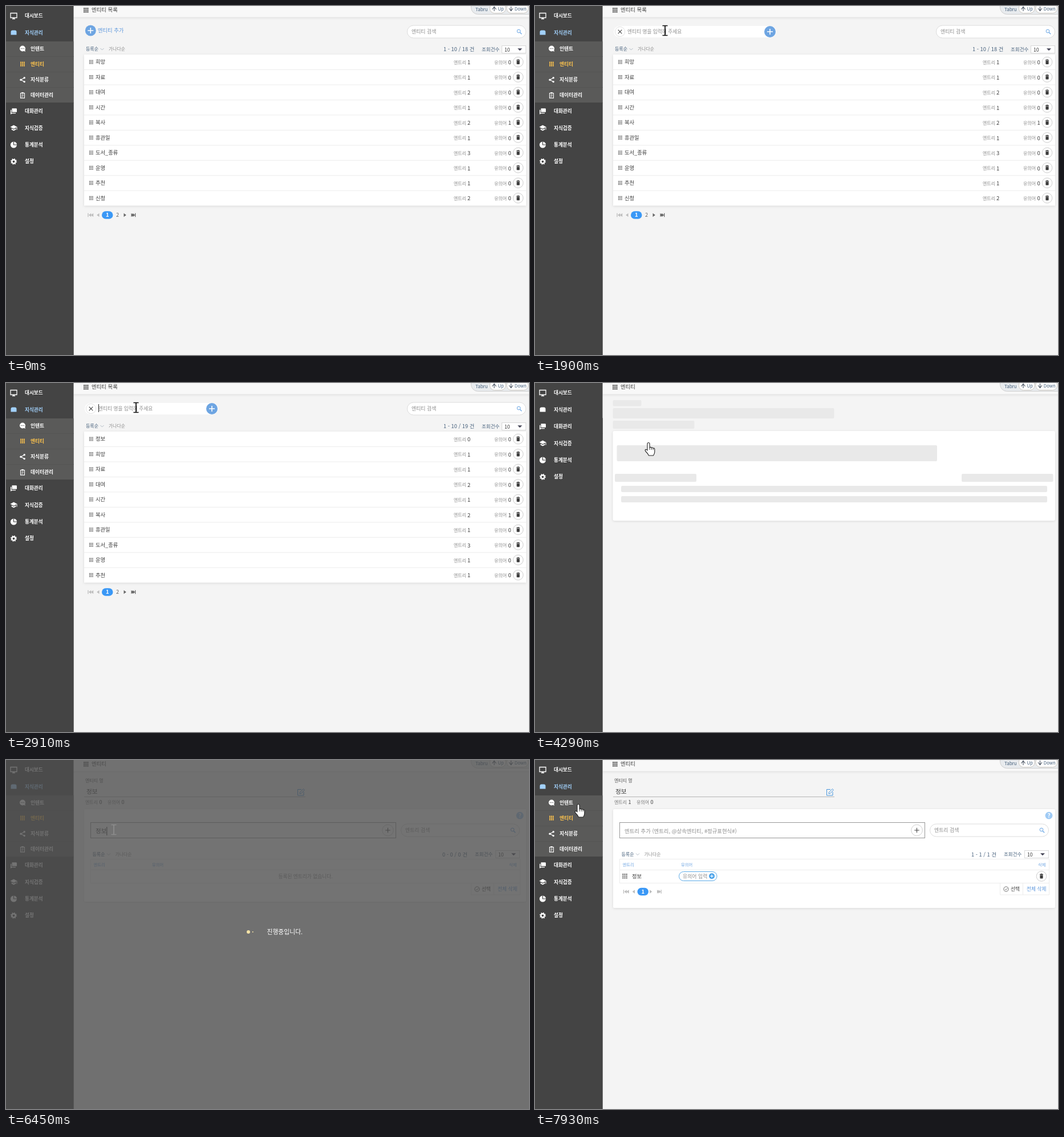
An HTML page that plays this animation: 917 px wide and 611 px high, repeating every 8 s.

```html
<!DOCTYPE html>
<html lang="ko">
<head>
<meta charset="utf-8">
<title>엔티티 관리</title>
<style>
html, body { margin: 0; width: 100%; height: 100%; overflow: hidden; background: #f4f4f4; }
svg { display: block; width: 100%; height: 100%; }
text { font-family: "Noto Sans CJK KR", "Noto Sans CJK JP", "Noto Sans CJK", "Noto Sans", sans-serif; white-space: pre; }
.card { fill: #fff; filter: drop-shadow(0 1px 2px #0000001c); }
.bar { filter: drop-shadow(0 1px 2px #0000001c); }
</style>
</head>
<body>
<svg id="stage" viewBox="0 0 917 611" xmlns="http://www.w3.org/2000/svg"></svg>
<script>
const BLUE = '#6ea5e2', INK = '#3b3b3b', NAVY = '#46607c', GRAY = '#8d8d8d', PALE = '#bdbdbd';

// Drawing helpers; text is placed by its left edge and vertical centre.
const text = (x, cy, size, fill, str, more = '') =>
  `<text x="${x}" y="${(cy + size * .36).toFixed(2)}" font-size="${size}" fill="${fill}" ${more}>${str}</text>`;
const rect = (x, y, w, h, fill, more = '') =>
  `<rect x="${x}" y="${y}" width="${w}" height="${h}" fill="${fill}" ${more}/>`;
const disc = (x, y, r, fill, more = '') => `<circle cx="${x}" cy="${y}" r="${r}" fill="${fill}" ${more}/>`;
const line = (d, color, w = 1, more = '') => `<path d="${d}" fill="none" stroke="${color}" stroke-width="${w}" ${more}/>`;
const shape = (d, fill, more = '') => `<path d="${d}" fill="${fill}" ${more}/>`;
const group = (id, body, more = '') => `<g id="${id}" ${more}>${body}</g>`;
const move = (x, y, body) => `<g transform="translate(${x} ${y})">${body}</g>`;
const repeat = (n, fn) => Array.from({ length: n }, (_, i) => fn(i)).join('');

const grip = (x, y, step, size, fill) => repeat(9, i =>
  rect(x + (i % 3 - 1) * step - size / 2, y + (Math.floor(i / 3) - 1) * step - size / 2, size, size, fill));
const plus = (x, y, r, color, w) => line(`M${x - r} ${y}h${2 * r}M${x} ${y - r}v${2 * r}`, color, w);
const chevron = (x, y) => line(`M${x - 3} ${y - 1.5}l3 3 3-3`, '#aab4bf', .9);
const lens = (x, y) => line(`M${x + 1.2} ${y + 1.2}l3 3`, '#6aa6e4', 1.3) +
  disc(x - 1, y - 1, 2.9, 'none', 'stroke="#6aa6e4"');
const trash = (x, y) => disc(x, y, 8.8, '#fff', 'stroke="#ccc"') +
  move(x, y, rect(-3, -3.8, 6, 1.3, INK) + rect(-1.2, -4.6, 2.4, 1.2, INK) + shape('M-2.6-1.9H2.6V3.2Q2.6 4 1.8 4H-1.8Q-2.6 4-2.6 3.2Z', INK));
const search = (x, y, w, str) => rect(x, y, w, 22, '#fff', 'rx="11" stroke="#dcdcdc"') +
  text(x + 7.5, y + 11, 8.9, GRAY, str) + lens(x + w - 11.5, y + 11);
const select = (x, y) => rect(x, y, 42, 13, '#fff', 'stroke="#d9d9d9"') +
  text(x + 4.5, y + 7, 8.7, INK, '10') + shape(`M${x + 27.5} ${y + 4.8}h8l-4 4z`, '#445');
const sorter = (x, y) => text(x, y, 8, NAVY, '등록순', 'font-weight="500"') + chevron(x + 28.5, y) +
  text(x + 40, y, 7.9, GRAY, '가나다순');
const total = (x, y, str) => text(x, y, 9.3, NAVY, str);
const pager = (x, y, pages, after) => {
  const back = n => shape(`M${n + 2} ${y - 3.3}v6.6l-4.3-3.3z`, PALE);
  const next = n => shape(`M${n - 2} ${y - 3.3}v6.6l4.3-3.3z`, after);
  const gap = pages > 1 ? 17 : 0;
  return rect(x - 3.7, y - 3.3, 1.3, 6.6, PALE) + back(x + .3) + back(x + 4.2) + back(x + 14.5) +
    rect(x + 21, y - 6.8, 19.5, 13.6, '#3a98f6', 'rx="6.8"') +
    text(x + 30.7, y, 9.5, '#fff', '1', 'text-anchor="middle" font-weight="700"') +
    (gap ? text(x + 48.5, y, 9.3, '#666', '2', 'text-anchor="middle"') : '') +
    next(x + 46 + gap - 1.5) + next(x + 60 + gap - 2.5) + next(x + 60 + gap) + rect(x + 60 + gap + 2, y - 3.3, 1.3, 6.6, after);
};

// Sidebar
const icons = {
  monitor: line('M-5.5-4.5h11v8h-11zM-2.5 5.5h5M0 3.5v2', '#fff', 1.3),
  box: shape('M-5-1Q-5-4-2-4H2Q5-4 5-1V4H-5Z', 'currentColor'),
  chat: shape('M-3-5H4.2Q5.5-5 5.5-3.7V1.6H-3Z', '#fff') + shape('M-5.5-2.5H-4V2.7H3.5V4H-3L-5.5 5.6Z', '#fff'),
  cap: shape('M0-5L6-1.8 0 1.4-6-1.8Z', '#fff') + shape('M-3.8.6L0 2.6 3.8.6V3L0 5-3.8 3Z', '#fff') + line('M5.5-1.8V3', '#fff'),
  pie: disc(0, 0, 5.6, '#fff') + line('M0-5.6V0H5.6', '#444', 1.2),
  gear: disc(0, 0, 3.1, 'none', 'stroke="#fff" stroke-width="2.4"') +
    disc(0, 0, 4.6, 'none', 'stroke="#fff" stroke-width="1.6" stroke-dasharray="1.8 1.81"')
};
const item = (y, icon, label, color = '#fff') => move(13.5, y, icons[icon]) +
  text(33, y, 8.6, color, label, 'font-weight="700"');
const subIcons = [
  disc(0, -.5, 5, '#fff') + shape('M1 3l4 2-1-4z', '#fff') + repeat(3, i => disc(i * 2.4 - 2.4, -.5, .7, '#555')),
  grip(0, -.5, 2.9, 2.1, '#ffc44d'),
  line('M3.5-3.5L-3 0 3.5 3.5', '#fff', 1.2) + disc(3.2, -3.4, 1.7, '#fff') + disc(-3, 0, 1.7, '#fff') + disc(3.2, 3.4, 1.7, '#fff'),
  line('M-3.5-3.8h7v8.6h-7z', '#fff', 1.1) + rect(-1.8, -5.2, 3.6, 2.4, '#fff') + line('M-1.8-.8h3.6M-1.8 1h3.6M-1.8 2.8h2', '#fff', .8)
];
const sidebar = rect(0, 0, 118.5, 611, '#444') + item(17, 'monitor', '대시보드') +
  rect(0, 62, 118.5, 108, '#5a5a59') +
  ['인텐트', '엔티티', '지식분류', '데이터관리'].map((label, i) => {
    const y = 75 + 27.1 * i;
    return (i ? rect(0, Math.round(y - 14), 118.5, 1, '#555554') : '') + move(29, y, subIcons[i]) +
      text(43, y, 8.7, i === 1 ? '#ffc44d' : '#fff', label, 'font-weight="700"');
  }).join('') +
  group('base', item(46.5, 'box', '지식관리', 'currentColor')) +
  group('lower', rect(0, 169, 118.5, 560, '#444') + item(184.2, 'chat', '대화관리') + item(213.6, 'cap', '지식검증') +
    item(243, 'pie', '통계분석') + item(272.3, 'gear', '설정'));

// Header
const arrow = (x, y, dir) => line(`M${x} ${y - 4}v8M${x - 3.5} ${y - dir}l3.5 ${dir * 4.6} 3.5 ${-dir * 4.6}`, '#4b5563', 1.1);
const header = rect(118.5, -5, 800, 24.5, '#f8f8f8', 'class="bar"') + grip(140.3, 7.3, 3.1, 2.2, '#4a4a4a') +
  group('titleList', text(150, 7, 9.4, INK, '엔티티 목록', 'font-weight="500"')) +
  group('titleOne', text(150, 7, 9.4, INK, '엔티티', 'font-weight="500"')) +
  rect(815.5, -12, 112, 26.5, '#e8ebee', 'rx="12" stroke="#cfcfcf"') + text(823, 6, 8, NAVY, 'Tabru') +
  rect(848.5, -5, 27.5, 17.5, '#fff', 'rx="8" stroke="#cdc8c0"') + arrow(856, 5, -1) + text(862.5, 5, 7.8, NAVY, 'Up') +
  rect(878, -5, 37.5, 17.5, '#fff', 'rx="8" stroke="#cdc8c0"') + arrow(885.5, 5, 1) + text(891.8, 5, 7.8, NAVY, 'Down');

// Entity list
const entities = [['정보', 0, 0], ['희망', 1, 0], ['자료', 1, 0], ['대여', 2, 0], ['시간', 1, 0], ['복사', 2, 1],
  ['휴관일', 1, 0], ['도서_종류', 3, 0], ['운영', 1, 0], ['추천', 1, 0], ['신청', 2, 0]];
const rows = from => entities.slice(from, from + 10).map(([name, entries, synonyms], i) => {
  const y = 98 + 26.47 * i;
  return (i ? rect(137, y - 13.5, 775, 1, '#ececec') : '') + grip(149.3, y, 2.6, 1.6, '#555') + text(157, y, 9.3, INK, name) +
    text(785, y + 1, 8, GRAY, '엔트리') + text(809, y + .8, 9.5, INK, entries) +
    text(856, y + 1, 8, GRAY, '유의어') + text(880.5, y + .8, 9.5, INK, synonyms) + trash(898, y);
}).join('');
const list = group('addLink', disc(148.3, 43, 9.5, BLUE) + plus(148.3, 43, 5, '#fff', 1.6) + text(161, 43, 9.3, '#5d97dc', '엔티티 추가')) +
  group('form', rect(138, 35, 0, 20, '#fff', 'rx="10" id="formBox"') + disc(149, 45, 8.6, '#fff', 'stroke="#e2e2e2"') +
    line('M145.7 41.7l6.6 6.6m0-6.6l-6.6 6.6', '#444', 1.1) + text(162, 44.5, 8.7, GRAY, '엔티티 명을 입력해 주세요', 'id="hint1"') +
    text(162, 44.5, 8.9, INK, '', 'id="typed1"') + rect(162, 37, 1, 14, '#222', 'id="caret1"') +
    group('formPlus', disc(0, 0, 10, BLUE) + plus(0, 0, 5, '#fff', 1.6))) +
  search(703.5, 34, 208, '엔티티 검색') + sorter(140, 75.5) + text(834, 75.5, 8.5, NAVY, '조회건수') + select(869.5, 69.5) +
  rect(137, 85, 775, 264.5, '#fff', 'class="card"') +
  group('rowsOld', total(767, 75.7, '1 - 10 / 18 건') + rows(1)) + group('rowsNew', total(767, 75.7, '1 - 10 / 19 건') + rows(0)) +
  pager(147, 366, 2, '#666');

// Loading placeholder
const skeleton = rect(136.5, 84, 775.5, 157, '#fff', 'class="card" rx="3"') +
  [[136.5, 30, 50, 10.5], [136.5, 44, 388, 18], [136.5, 66, 143, 14], [143.5, 109, 561.5, 28], [140, 159, 143, 14],
    [748, 159, 160.5, 14], [151, 180, 747, 11], [151, 198, 747, 11]].map(b => rect(...b, '#e9e9e9', 'rx="2"')).join('');

// Entity detail
const stat = (x, label, n) => text(x, 74, 8, '#777', label) + text(x + 24.5, 74, 9, INK, n);
const detail = text(139, 36, 8, '#555', '엔티티 명') + text(141, 55, 10.7, INK, '정보') + rect(137, 64, 388, 1, '#b5b5b5') +
  line('M518 51.5h-6.5v10.5h10.5v-6M515 59l.5-2.5 6-6 2 2-6 6z', '#4795dc') + stat(178, '유의어', 0) +
  rect(137, 86, 775, 162, '#fff', 'class="card" rx="2" id="panel"') +
  disc(901, 97.2, 6.4, '#a0cbf5') + text(901, 97.2, 10, '#fff', '?', 'text-anchor="middle" font-weight="700"') +
  rect(148.5, 109.5, 535, 27, '#fff', 'stroke="#979797"') + disc(669.5, 123, 9.8, '#fff', 'stroke="#cfcfcf"') + plus(669.5, 123, 4.2, '#444', 1.1) +
  text(157, 124.5, 9.4, GRAY, '엔트리 추가 (엔트리, @상속엔티티, #정규표현식#)', 'id="hint2"') +
  text(157, 124, 10.5, INK, '', 'id="typed2"') + rect(157, 117, 1, 15, '#222', 'id="caret2"') +
  search(692.5, 112, 208, '엔트리 검색') + sorter(151.5, 165) + text(822, 165, 8.5, NAVY, '조회건수') + select(858.5, 158.5) +
  rect(148.5, 173.5, 753, 42, 'none', 'stroke="#ececec"') + rect(148, 192, 754, 1, '#ececec') +
  text(153.5, 183, 7.3, BLUE, '엔트리') + text(256, 183, 7.3, BLUE, '유의어') + text(882, 183, 7.3, BLUE, '삭제') +
  line('M815.5 215.5v20.5h86v-20.5M855.5 215.5v20.5', '#ececec') +
  disc(826, 226, 4.2, 'none', 'stroke="#666" stroke-width=".9"') + line('M824 226l1.6 1.7 2.8-3.2', '#666', .9) +
  text(834, 226, 8.6, INK, '선택') + text(862, 226, 8.7, '#5d97dc', '전체 삭제') +
  group('empty', stat(139, '엔트리', 0) + total(765, 165.2, '0 - 0 / 0 건') + text(525, 204, 8.7, GRAY, '등록된 엔트리가 없습니다.', 'text-anchor="middle"')) +
  group('filled', stat(139, '엔트리', 1) + total(765, 165.2, '1 - 1 / 1 건') + grip(157.5, 203.3, 3.2, 2, '#555') + text(170, 203.5, 9.3, INK, '정보') +
    rect(252.5, 195.5, 66.5, 16, '#fff', 'rx="8" stroke="#5aa9e6"') + text(259, 203.5, 8.9, GRAY, '유의어 입력') +
    disc(310, 203.3, 5, '#4aa3ea') + plus(310, 203.3, 2.7, '#fff', 1.2) + trash(888, 203.5) + pager(158.5, 230.5, 1, PALE));

const overlay = rect(0, 0, 917, 611, '#4e4e4e', 'opacity=".79"') +
  repeat(3, i => disc(425 + 7.7 * i, 301, 0, '#f3e2a6', `id="dot${i}"`)) +
  text(457.5, 301, 10.8, '#fff', '진행중입니다.', 'font-weight="500"');

const outline = 'stroke="#222" stroke-width="1.1" stroke-linejoin="round"';
const pointers = group('arrow', shape('M0 0V16.5L3.8 13 6.3 18.8 8.9 17.7 6.4 12H11.6Z', '#fff', outline)) +
  group('hand', shape('M-2 1.5Q-2-.5 0-.5T2 1.5V8Q4 6.5 5.2 8.5 7 7.2 8.2 9.2 10.6 8.4 10.8 11V16Q10.5 19 8.5 22H.5Q-1 18.5-5.2 14.5-6.5 12.3-5 11.3-3.5 11-2 13Z', '#fff', outline) +
    line('M2 8v4M5.2 8.5v3.5M8.2 9.2v3', '#222', .9)) +
  group('beam', line('M0-8.5V8.5', 'currentColor', 1.8) + line('M-4.5-8.5H4.5M-4.5 8.5H4.5', 'currentColor', 1.4));

document.getElementById('stage').innerHTML = rect(0, 0, 917, 611, '#f4f4f4') + header +
  group('list', list) + group('skeleton', skeleton) + group('detail', detail) + group('side', sidebar) +
  group('overlay', overlay) + group('pointer', pointers);

const $ = Object.fromEntries([...document.querySelectorAll('[id]')].map(el => [el.id, el]));
const show = (id, on) => { $[id].style.display = on ? '' : 'none'; };
const within = (t, a, b) => t >= a && t < b;

// Latest value whose start time has passed.
const step = (t, keys) => keys.reduce((value, [at, next]) => t >= at ? next : value, keys[0][1]);
// Eased position along [time, ...values] stops.
const track = (t, stops) => {
  const i = stops.findLastIndex(s => t >= s[0]);
  if (i < 0) return stops[0].slice(1);
  const a = stops[i], b = stops[i + 1];
  if (!b) return a.slice(1);
  const p = (t - a[0]) / (b[0] - a[0]), e = p * p * (3 - 2 * p);
  return a.slice(1).map((v, k) => v + (b[k + 1] - v) * e);
};

const PATH = [[190, 535, 545], [880, 148, 43], [1010, 148, 43], [1700, 228, 43], [3000, 228, 43], [3510, 224, 54],
  [4100, 199, 105], [5110, 199, 105], [5300, 190, 125], [5400, 190, 125], [5510, 189, 122], [7310, 189, 122], [7790, 70, 65], [7860, 70, 65], [7930, 76, 78]];
const KIND = [[0, 'arrow'], [800, 'hand'], [1230, 'beam'], [3380, 'arrow'], [3860, 'hand'], [5200, 'beam'], [7370, 'arrow'], [7700, 'hand']];
const FORM = [[1010, 148], [1560, 412], [2910, 412], [2910, 361], [2970, 361], [3180, 412]];
const MENU = [[4290, 0], [4640, 0], [4920, 1]];
const TYPED1 = [[0, ''], [2100, 'ㅈ'], [2200, '저'], [2300, '정'], [2500, '정ㅂ'], [2570, '정보'], [2910, '']];
const TYPED2 = [[0, ''], [5790, 'ㅈ'], [5930, '저'], [6040, '정'], [6180, '정ㅂ'], [6250, '정보'], [6650, '']];

function field(n, t, keys, x, size, caretOn) {
  const value = step(t, keys);
  $['typed' + n].textContent = value;
  $['caret' + n].setAttribute('x', x + value.length * size * .92);
  show('caret' + n, caretOn);
  return !value;
}

function render(t) {
  const onList = t < 4290, renewed = t >= 2910, done = t >= 6650;
  const busy = within(t, 2770, 2910) || within(t, 6450, 6650);
  show('titleList', onList);
  show('titleOne', !onList);
  show('list', onList);
  show('skeleton', within(t, 4290, 4850));
  show('detail', t >= 4850);
  $.detail.style.opacity = track(t, [[4850, .2], [5180, 1]])[0];

  const [end] = track(t, FORM);
  show('addLink', t < 1010);
  show('form', t >= 1010);
  $.formBox.setAttribute('width', end - 127);
  $.formPlus.setAttribute('transform', `translate(${end} 45)`);
  const blank1 = field(1, t, TYPED1, 162, 8.9, within(t, 1400, 1900) || within(t, 2100, 3440));
  show('hint1', blank1 && end > 275);
  show('rowsOld', !renewed);
  show('rowsNew', renewed);

  const blank2 = field(2, t, TYPED2, 157, 10.5, within(t, 5790, 6980));
  show('hint2', blank2);
  show('empty', !done);
  show('filled', done);
  $.panel.setAttribute('height', done ? 173 : 162);

  const open = onList ? 1 : track(t, MENU)[0];
  $.lower.setAttribute('transform', `translate(0 ${-108 * (1 - open)})`);
  $.base.style.color = open > 0 ? '#a2d1fc' : '#fff';

  show('overlay', busy);
  const beat = (t - (t < 4000 ? 2770 : 6450)) / 200;
  for (let i = 0; i < 3; i++) $['dot' + i].setAttribute('r', Math.max(0, 3 - Math.abs(beat - i) * 2));

  const [x, y] = track(t, PATH), kind = step(t, KIND);
  show('pointer', t >= 190);
  $.pointer.setAttribute('transform', `translate(${x} ${y})`);
  $.pointer.style.color = busy ? '#8c8c8c' : '#111';
  for (const name of ['arrow', 'hand', 'beam']) show(name, name === kind);
}

const start = performance.now();
function tick() {
  render((performance.now() - start) % 8000);
  requestAnimationFrame(tick);
}
tick();
</script>
</body>
</html>
```
